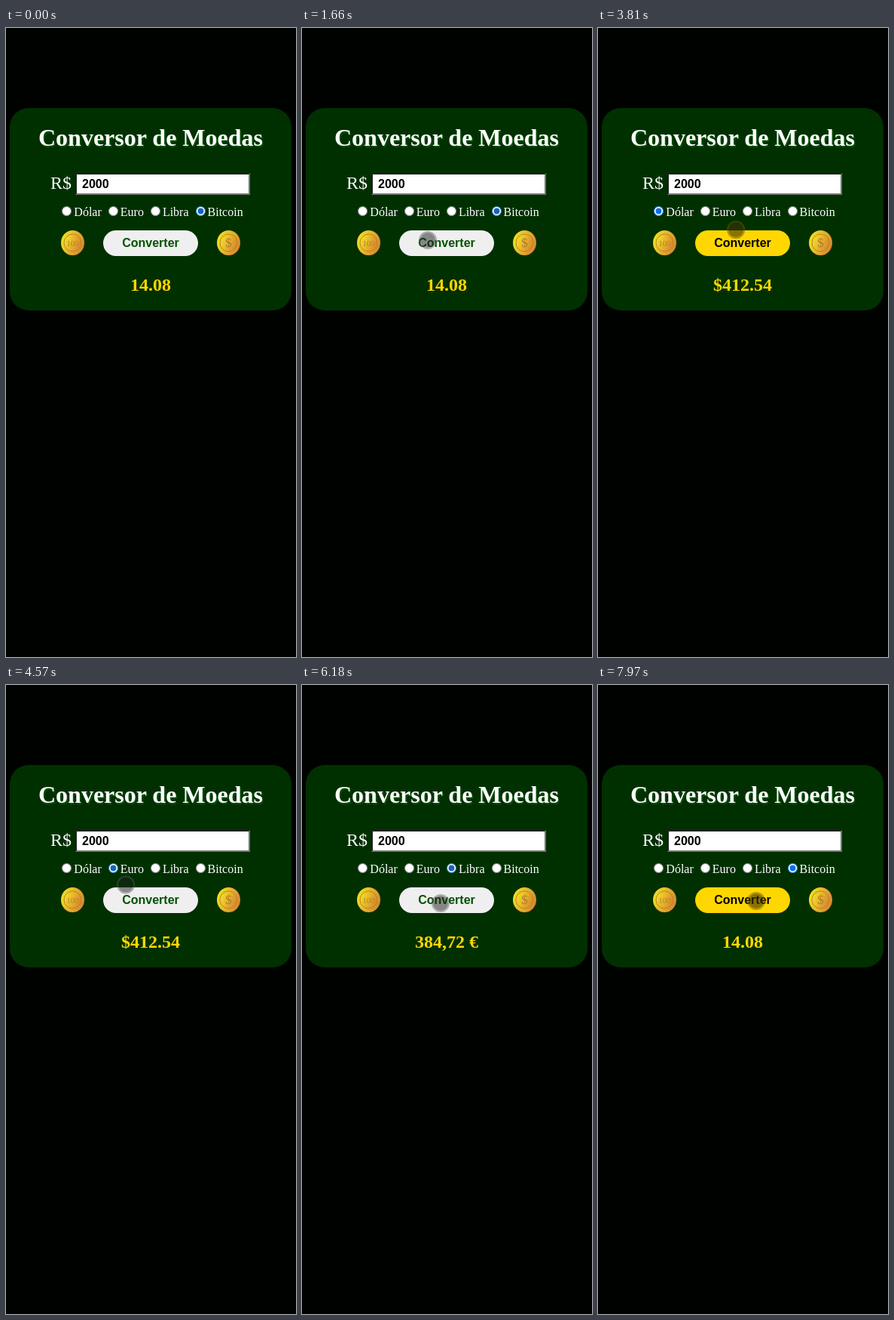
Animation of 385 by 833 pixels, one loop 8 s. Source, as an HTML page:

```html
<!DOCTYPE html>
<html lang="pt-BR">
<head>
<meta charset="utf-8">
<title>Conversor de Moedas</title>
<style>
  html, body { margin: 0; width: 100%; height: 100%; overflow: hidden; background: #000200; }
  body { font: 16px/17px "Liberation Serif", "Times New Roman", serif; color: #fff; pointer-events: none; }
  body > * { position: absolute; margin: 0; white-space: nowrap; box-sizing: border-box; }
  .line { left: 5px; width: 374px; text-align: center; }
  #panel { left: 5px; top: 106px; width: 374px; height: 268px; border-radius: 25px; background: #003000; }
  h1 { top: 127px; font-size: 32px; line-height: 36px; text-shadow: 1.5px 2px 1.5px #0b540b; }
  #sign { left: 59px; top: 192px; font-size: 24px; line-height: 26px; }
  #amount, #button { font: bold 16px/17px "Liberation Sans", Arial, sans-serif; }
  #amount { left: 92px; top: 192px; width: 232px; height: 29px; padding: 1px 7px; border-radius: 0; background: #fff; color: #000; }
  #options { top: 233px; }
  #options input { margin: 3px 3px 0 5px; accent-color: #1466b8; }
  .lit #options input { accent-color: #0a70e6; }
  #button { left: 129px; top: 268px; width: 126px; height: 34px; padding-top: 8px; border-radius: 17px;
            text-align: center; background: #efefef; color: #005200; }
  .lit #button { background: #ffd700; color: #000; }
  #result { top: 327px; font-size: 24px; line-height: 26px; font-weight: bold; color: #ffd700; }
  .coin { top: 267px; width: 33px; height: 35px; }
  #cursor { left: -12px; top: -12px; width: 24px; height: 24px; border-radius: 50%;
            border: 2px solid rgba(90, 90, 90, .45); background: rgba(30, 30, 30, .5) padding-box; }
  .lit #cursor { border-color: rgba(165, 160, 16, .72); background-color: rgba(165, 160, 16, .76); }
  .lit #cursor.pressing { border-color: rgba(110, 95, 0, .5); background-color: rgba(60, 50, 0, .6); }
</style>
</head>
<body>
<div id="panel"></div>
<h1 class="line">Conversor de Moedas</h1>
<div id="sign">R$</div>
<input id="amount" value="2000" readonly tabindex="-1">
<div id="options" class="line"></div>
<svg class="coin" style="left:72px" viewBox="-16.5 -17.5 33 35">
  <defs>
    <linearGradient id="metal" x1="0" y1=".3" x2="1" y2=".7">
      <stop offset="0" stop-color="#f2e222"/>
      <stop offset=".45" stop-color="#e6b62c"/>
      <stop offset="1" stop-color="#d8852f"/>
    </linearGradient>
    <g id="coin" fill="url(#metal)">
      <ellipse rx="15.5" ry="16.5"/>
      <circle r="11.5" stroke="#b98428"/>
    </g>
  </defs>
  <use href="#coin"/>
  <text y="4" font-size="11" text-anchor="middle" fill="#b8842a">100</text>
</svg>
<svg class="coin" style="left:279px" viewBox="-16.5 -17.5 33 35">
  <use href="#coin"/>
  <text y="5.5" font-size="17" text-anchor="middle" fill="#b07a28">$</text>
</svg>
<div id="button">Converter</div>
<div id="result" class="line"></div>
<div id="cursor"></div>
<script>
  const LOOP = 8000, GLIDE = 550;
  const $ = id => document.getElementById(id);

  // One round per currency: when it is picked, when the button is tapped, what it gives
  const ROUNDS = [
    { name: 'Dólar', pick: 2860, tap: 3750, gives: '$412.54' },
    { name: 'Euro', pick: 4370, tap: 4930, gives: '384,72 €' },
    { name: 'Libra', pick: 5720, tap: 6250, gives: '£329.00' },
    { name: 'Bitcoin', pick: 7200, tap: 7740, gives: '14.08' }
  ];

  // Where the pointer comes to rest: arrival time, x, y
  const STOPS = [
    [650, 362, 634], [1130, 159, 222], [1430, 182, 270], [1660, 167, 281],
    [2250, 86, 244], [3700, 188, 279], [4250, 142, 241], [4900, 190, 281],
    [5200, 194, 249], [5900, 184, 289], [6850, 268, 241], [7430, 210, 286]
  ];

  const radios = ROUNDS.map(({ name }) => {
    const radio = document.createElement('input');
    radio.type = 'radio';
    radio.name = 'currency';
    $('options').append(radio, name + ' ');
    return radio;
  });

  const last = ROUNDS.length - 1;
  const smooth = u => u * u * (3 - 2 * u);

  function place(t) {
    const i = STOPS.findIndex(stop => stop[0] > t);
    if (i < 0) return STOPS[STOPS.length - 1].slice(1);
    if (i === 0) return t >= 190 && t < 260 ? [371, 831] : null;
    const [left, x0, y0] = STOPS[i - 1], [arrive, x1, y1] = STOPS[i];
    const leave = Math.max(left, arrive - GLIDE);
    const u = Math.max(0, (t - leave) / (arrive - leave));
    return [x0 + (x1 - x0) * smooth(u), y0 + (y1 - y0) * Math.sin(u * Math.PI / 2)];
  }

  function draw(t) {
    const picked = ROUNDS.filter(r => r.pick <= t).length;
    const tapped = ROUNDS.filter(r => r.tap <= t).length;
    radios[(picked + last) % radios.length].checked = true;
    $('result').textContent = ROUNDS[(tapped + last) % ROUNDS.length].gives;
    document.body.classList.toggle('lit', tapped > 0 && tapped === picked);

    const spot = place(t);
    const cursor = $('cursor');
    cursor.hidden = !spot;
    if (!spot) return;
    cursor.style.transform = `translate(${spot[0]}px, ${spot[1]}px)`;
    cursor.classList.toggle('pressing', spot[1] > 262);
  }

  const begin = performance.now();
  function frame() {
    draw((performance.now() - begin) % LOOP);
    requestAnimationFrame(frame);
  }
  frame();
</script>
</body>
</html>
```
